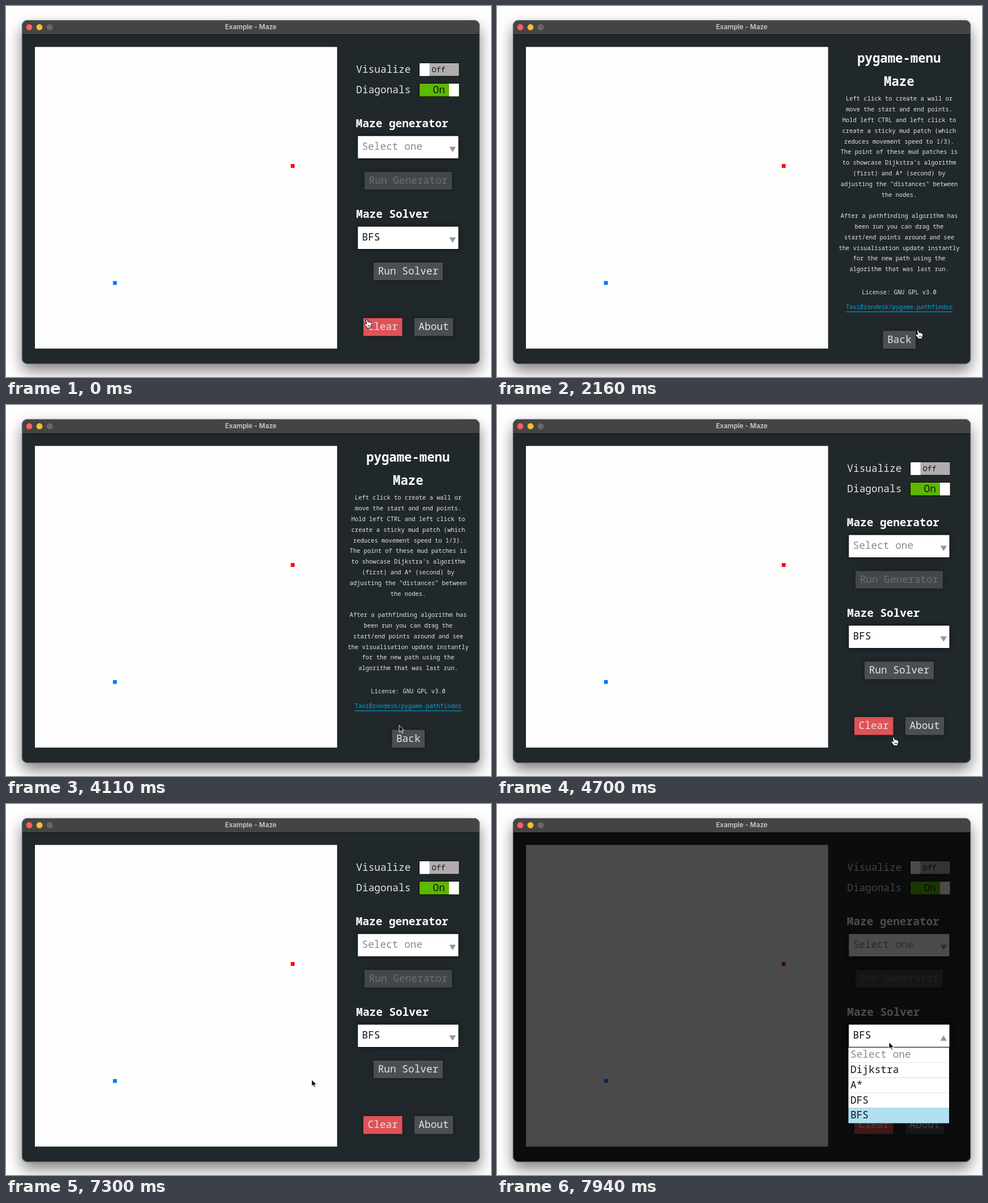
An HTML page that plays this animation: 855 px wide and 655 px high, repeating every 8 s.

```html
<!DOCTYPE html>
<html lang="en">
<head>
<meta charset="utf-8">
<title>Example - Maze</title>
<style>
  html, body { margin: 0; width: 100%; height: 100%; overflow: hidden; background: #fff; }
  #window {
    position: absolute; left: 28px; top: 25px; width: 807px; height: 607px;
    border-radius: 10px; background: #21282b;
    box-shadow: 0 12px 26px rgba(0, 0, 0, .5), 0 0 1px rgba(0, 0, 0, .8);
  }
  svg { position: absolute; left: 0; top: 0; }
  text { font: 17.8px "Noto Sans Mono", "DejaVu Sans Mono", monospace; fill: #e4e4e4; }
  .title { font: 600 11.8px Inter, Roboto, sans-serif; fill: #cacaca; }
  .head { font-size: 19.4px; font-weight: 700; fill: #fff; }
  .big { font-size: 22.3px; font-weight: 700; fill: #fff; }
  .small { font-size: 10.45px; }
  .off { font-size: 13.4px; }
  .dark { fill: #151515; }
  .grey { fill: #8a8a8a; }
  .link { fill: #00a4dc; }
  .faint { fill: #6b6f71; }
  .raised { filter: drop-shadow(0 0 4px rgba(0, 0, 0, .38)); }
  .mid { text-anchor: middle; }
</style>
</head>
<body>
<div id="window"></div>
<svg id="stage" width="855" height="655" viewBox="0 0 855 655"></svg>
<script>
const LOOP = 8000, LAG = 60;
const ABOUT_OPEN = 2160, ABOUT_CLOSE = 4650, LIST_OPEN = 7940;

const rect = (x, y, w, h, fill, extra = '') =>
  `<rect x="${x}" y="${y}" width="${w}" height="${h}" fill="${fill}" ${extra}/>`;
const text = (x, y, str, cls = '') => `<text x="${x}" y="${y}" class="${cls}">${str}</text>`;
const path = (d, fill, extra = '') => `<path d="${d}" fill="${fill}" ${extra}/>`;

const GREY = '#4b4f51', GREY_HOVER = '#62676a';
const buttons = {
  solver: { page: 'main', label: 'Run Solver', box: [648, 453, 122, 31], fill: GREY, hover: GREY_HOVER },
  clear: { page: 'main', label: 'Clear', box: [630, 551, 68.5, 31.5], fill: '#df5358', hover: '#980000' },
  about: { page: 'main', label: 'About', box: [720, 551, 68, 31.5], fill: GREY, hover: GREY_HOVER },
  back: { page: 'info', label: 'Back', box: [680.5, 573.5, 57.5, 31.5], fill: GREY, hover: GREY_HOVER }
};
const link = { page: 'info', box: [615, 524, 188, 17] };

const button = (id, { label, box: [x, y, w, h], fill }, cls = '') =>
  `<g class="raised">${rect(x, y, w, h, fill, `id="${id}"`)}</g>` +
  text(x + w / 2, y + 21.3, label, 'mid ' + cls);
const pageButtons = page => Object.entries(buttons)
  .filter(([, b]) => b.page === page).map(([id, b]) => button(id, b)).join('');

const toggle = (y, fill, knobX) =>
  rect(728.5, y, 70.5, 23.5, fill, 'stroke="#080a0b"') + rect(knobX, y + .5, 17.5, 22.5, '#fff');

const select = (y, label, cls, up) =>
  `<g class="raised">${rect(619.8, y, 178.2, 40.5, '#fff', 'stroke="#0a0c0d"')}</g>` +
  text(627.5, y + 25.3, label, cls) +
  path(up ? `M781.5 ${y + 29}h11.5l-5.7-9.5z` : `M781.5 ${y + 19.5}h11.5l-5.7 9.5z`, '#969696');

const mainPage =
  text(617.3, 117.5, 'Visualize') + text(617.3, 153.5, 'Diagonals') +
  toggle(100.5, '#b1adae', 729) + text(750.5, 116.5, 'Off', 'off dark') +
  toggle(136.5, '#5cb800', 781) + text(752.5, 154, 'On', 'dark') +
  text(616.8, 214, 'Maze generator', 'head') + select(229, 'Select one', 'grey') +
  button('generator', { label: 'Run Generator', box: [632, 293, 154, 31], fill: '#42474a' }, 'faint') +
  text(617.3, 374, 'Maze Solver', 'head') + select(389, 'BFS', 'dark') +
  pageButtons('main');

const infoLines = `Left click to create a wall or
move the start and end points.
Hold left CTRL and left click to
create a sticky mud patch (which
reduces movement speed to 1/3).
The point of these mud patches is
to showcase Dijkstra's algorithm
(first) and A* (second) by
adjusting the "distances" between
the nodes.

After a pathfinding algorithm has
been run you can drag the
start/end points around and see
the visualisation update instantly
for the new path using the
algorithm that was last run.`.split('\n');

const infoPage =
  text(708.8, 100, 'pygame-menu', 'big mid') + text(708.8, 141, 'Maze', 'big mid') +
  infoLines.map((line, i) => text(709, 167.3 + i * 18.81, line, 'small mid')).join('') +
  text(709, 509.3, 'License: GNU GPL v3.0', 'small mid') +
  text(709, 535.2, 'TaviBrondesk/pygame-pathfinder', 'small mid link') +
  rect(615, 539.3, 188.5, 1.1, '#00a4dc') + pageButtons('info');

const ROW = 26.75;
const listRow = (label, i) => {
  const y = 429.8 + i * ROW;
  return rect(619.5, y, 177.5, ROW, i === 4 ? '#b0e0f2' : '#fff') +
    (i && i < 4 ? rect(619.5, y - .5, 177.5, 1, '#e6e6e6') : '') +
    text(623, y + 18.6, label, i ? 'dark' : 'grey');
};
const list =
  path('M28 50.5H835V622a10 10 0 0 1-10 10H38a10 10 0 0 1-10-10z', 'rgba(0,0,0,.705)') +
  select(389, 'BFS', 'dark', true) +
  ['Select one', 'Dijkstra', 'A*', 'DFS', 'BFS'].map(listRow).join('') +
  rect(619.5, 428.8, 178, 1.2, '#151515');

const stage = document.getElementById('stage');
stage.innerHTML =
  path('M28 50V35a10 10 0 0 1 10-10H825a10 10 0 0 1 10 10V50z', '#444') +
  rect(28, 50, 807, 1, '#0d0f10') +
  ['#ff5f57', '#febc2e', '#686868'].map((c, i) => `<circle cx="${41 + 18 * i}" cy="37.5" r="5.4" fill="${c}"/>`).join('') +
  text(431.5, 41.3, 'Example - Maze', 'title mid') +
  rect(51, 72.3, 532.7, 532.5, '#fefefe') +
  rect(502, 279, 6.8, 6.8, '#f00') + rect(188.6, 485.6, 6.8, 6.8, '#0a74ff') +
  `<g id="main">${mainPage}</g><g id="info">${infoPage}</g><g id="list">${list}</g>` +
  rect(28.5, 25.5, 806, 606, 'none', 'rx="9.5" stroke="#707274" stroke-opacity=".75"') +
  '<g id="cursor"><g id="arrow">' +
  path('M0 .5V12.4L2.8 9.8 4.8 14.2 6.7 13.4 4.8 9.2H8.6Z', '#000', 'stroke="#fff"') +
  '</g><g id="hand">' +
  path('M-1.5 1.2Q0-.6 1.3 1.2L2.1 5Q3.6 4 4.6 5.3 6 4.6 7 6.2 8.8 6 9 8 9 11.5 7.5 13L7.3 15.5H.3Q-.6 12.5-3.4 10-5 7.6-3 7.2-1.6 7.2-.3 9Z', '#fff', 'stroke="#000"') +
  path('M2.2 10v3M4.2 10v3M6.1 10v3', 'none', 'stroke="#000" stroke-width=".8"') +
  '</g></g>';
const el = id => document.getElementById(id);

// Pointer moves: first step, last step, step count, end x, end y, sideways bow
const START = [636, 553];
const moves = [
  [60, 420, 7, 683, 471],
  [660, 1020, 7, 679, 568],
  [1320, 1860, 9, 742, 572],
  [2460, 2690, 5, 741, 551],
  [2740, 3040, 6, 675, 97],
  [3340, 3750, 8, 670, 546, -16],
  [3990, 4110, 3, 693, 565],
  [4170, 4290, 3, 699, 586],
  [5060, 5560, 9, 530, 490],
  [7300, 7640, 7, 691, 420]
];

function pointer(t) {
  let [x, y] = START;
  for (const [from, to, steps, endX, endY, bow = 0] of moves) {
    if (t < from) break;
    const step = Math.floor((t - from) / (to - from) * (steps - 1) + 1e-6);
    const f = Math.min(1, (step + 1) / steps);
    const p = f * f * (3 - 2 * f);
    x += (endX - x) * p + bow * Math.sin(Math.PI * p);
    y += (endY - y) * p;
  }
  return [x, y];
}

const pageAt = t => t >= ABOUT_OPEN && t < ABOUT_CLOSE ? 'info' : 'main';
const inside = ([px, py], { box: [x, y, w, h] }) => px >= x && px <= x + w && py >= y && py <= y + h;
const show = (id, on) => { el(id).style.display = on ? '' : 'none'; };

function draw(t) {
  const page = pageAt(t), tip = pointer(t), seen = pointer(t - LAG);
  show('main', page === 'main');
  show('info', page === 'info');
  show('list', t >= LIST_OPEN);

  // Button colours follow the pointer one step late
  for (const [id, b] of Object.entries(buttons)) {
    const over = t >= LAG && b.page === page && inside(seen, b);
    el(id).setAttribute('fill', over ? b.hover : b.fill);
  }
  const shapePage = pageAt(t - LAG);
  const hand = [...Object.values(buttons), link].some(b => b.page === shapePage && inside(tip, b));
  show('hand', hand);
  show('arrow', !hand);
  el('cursor').setAttribute('transform', `translate(${tip})`);
}

const start = performance.now();
function tick() {
  draw((performance.now() - start) % LOOP);
  requestAnimationFrame(tick);
}
tick();
</script>
</body>
</html>
```
